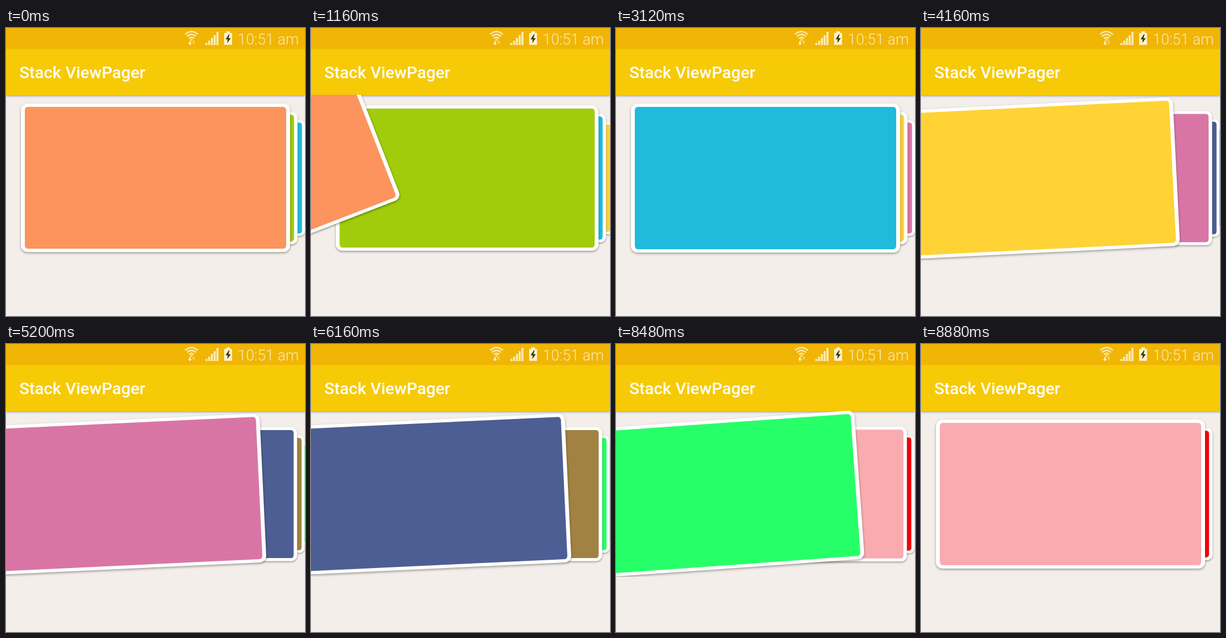
Animation of 540x522 px, one loop 8.92 s. Source, as an HTML page:

```html
<!DOCTYPE html>
<html lang="en">
<head>
<meta charset="utf-8">
<title>Stack ViewPager</title>
<style>
  html, body { margin: 0; width: 100%; height: 100%; overflow: hidden; }
  body { position: relative; background: #f3eeea; font-family: Roboto, sans-serif; }
  #pager { position: absolute; left: 0; top: 121px; width: 540px; height: 300.5px; overflow: hidden; }
  .card {
    position: absolute; left: 27px; top: 15.5px; width: 486px; height: 269.5px;
    box-sizing: border-box; border: solid #fff; border-width: 6.5px 7px;
    border-radius: 12px; box-shadow: 0 2px 4px rgba(0, 0, 0, .36);
  }
  #bar {
    position: absolute; left: 0; top: 0; width: 540px; height: 122px;
    background: linear-gradient(#f0b505 37.5px, #f6ca06 37.5px);
    box-shadow: 0 1px 4px rgba(0, 0, 0, .42);
  }
  svg { position: absolute; left: 0; top: 0; }
</style>
</head>
<body>
<div id="pager"></div>
<div id="bar">
  <svg width="540" height="122" viewBox="0 0 540 122">
    <g fill="none" stroke="#fbeab0" stroke-width="2.6">
      <path d="M323.5 11.5Q335 1.5 346.500 11.500"/>
      <path d="M327 15.300Q335 8 343 15.300"/>
      <path d="M330.500 19Q335 14.800 339.500 19"/>
    </g>
    <circle cx="335" cy="21.300" r="1.900" fill="#fbeab0"/>
    <path d="M331 23.500h2.500v3.500h2l-3.200 4.500l-3.300-4.500h2z" fill="#fdf0c4"/>
    <path d="M337.800 29.500h2.500v-3.500h2l-3.200-4l-3.300 4h2z" fill="#f4cf62"/>
    <g id="signal" fill="#fbe9ae"></g>
    <path d="M398 6h6.500v3h3.700v21.500h-14.200v-21.500h4z" fill="#fef3cf"/>
    <path d="M402.500 11.500l-6 9h4l-1 7l6.500-9h-4.200l2-7z" fill="#403207"/>
    <text x="529" y="29.500" text-anchor="end" font-size="27" font-weight="300" fill="#fbe9b2">10:51 am</text>
    <text x="24" y="91" font-size="30" font-weight="500" fill="#fff">Stack ViewPager</text>
  </svg>
</div>
<script>
const LOOP = 8920, STEP = 40;
const colors = ['#fd945e', '#a1cc0b', '#20badc', '#ffd335', '#d975a5',
                '#4c5e93', '#a18242', '#27ff69', '#f9abb0', '#f5000d'];

// start (ms), duration (ms), progress at the first step
const swipes = [
  [880, 600, .01], [2000, 520, .02], [3120, 560, 0], [4160, 440, .106],
  [5200, 440, .1], [6160, 440, .1], [7360, 400, .172], [8480, 400, .15]
];

const pager = document.getElementById('pager');
const cards = colors.map((color, i) => {
  const card = document.createElement('div');
  card.className = 'card';
  card.style.background = color;
  card.style.zIndex = colors.length - i;
  pager.append(card);
  return card;
});

document.getElementById('signal').innerHTML = [4, 8, 13, 18, 24]
  .map((h, i) => `<rect x="${360 + i * 5}" y="${31 - h}" width="3.8" height="${h}"/>`).join('');

const settle = u => 1 - (1 - u ** 1.3) ** 3.3;

function pageAt(t) {
  let page = 0;
  for (const [start, length, from] of swipes) {
    if (t < start) break;
    const u = Math.min(1, (t - start) / length);
    page += from + (1 - from) * settle(u);
  }
  return page;
}

function place(card, depth) {
  const shown = depth > -.997 && depth < 3.2;
  card.style.visibility = shown ? 'visible' : 'hidden';
  if (!shown) return;
  if (depth < 0) {
    card.style.transform = `translateX(${486 * depth}px) rotate(${27 * depth}deg)`;
    return;
  }
  // Each level shrinks by a ninth; its right edge peeks out another 13.5px.
  const level = Math.floor(depth + 1e-6);
  const edge = 13.5 * (level + Math.sqrt(Math.max(0, depth - level)));
  const scale = 1 - depth / 9;
  card.style.transform = `translateX(${edge + 243 * (1 - scale)}px) scale(${scale})`;
}

function draw(now) {
  const t = Math.floor(now % LOOP / STEP) * STEP;
  const page = pageAt(t);
  cards.forEach((card, i) => place(card, i - page));
  requestAnimationFrame(draw);
}
draw(performance.now());
</script>
</body>
</html>
```
